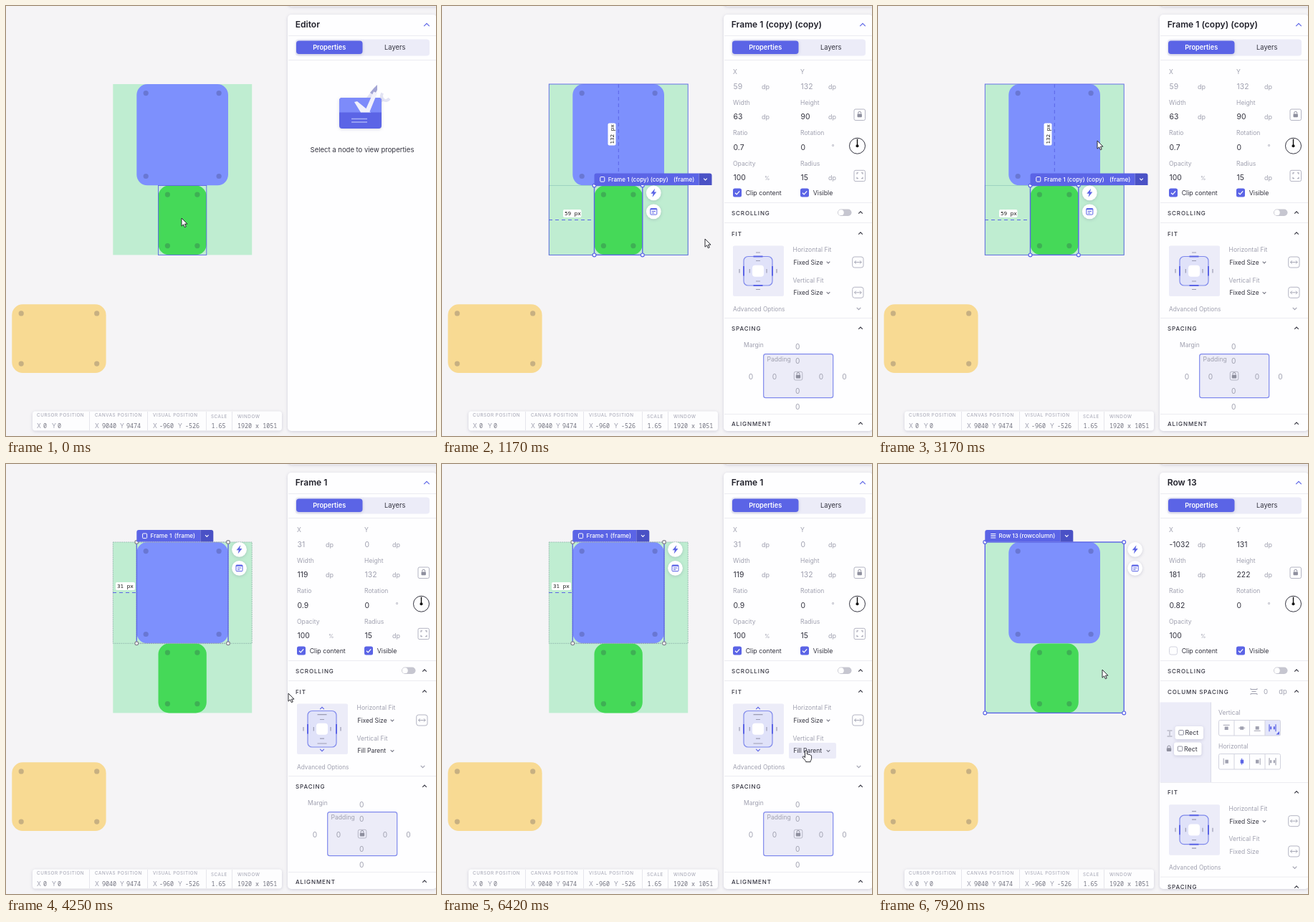
These frames come from a looping animation (600x600 px, 8 s). An HTML page:

```html
<!DOCTYPE html>
<html lang="en">
<head>
<meta charset="utf-8">
<title>Layout editor</title>
<style>
html, body { margin: 0; width: 100%; height: 100%; overflow: hidden; background: #f5f4f6; }
svg { display: block; width: 100vw; height: 100vh; font-family: Inter, sans-serif; }
.mono { font-family: "Noto Sans Mono", monospace; }
.shadow { filter: drop-shadow(0 1px 2px rgba(60, 60, 110, .2)); }
</style>
</head>
<body>
<svg id="stage" viewBox="0 0 600 600"></svg>
<script>
const LOOP = 8000, FPS = 12;
const INDIGO = '#5b64e6', SOFT = '#ececf8', INK = '#33333f', GREY = '#a0a1b0', LINE = '#ececf1';

const container = { x: 149.3, y: 109, w: 193.9, h: 238.4, name: 'Row 13', kind: '(rowcolumn)', tagW: 123, kindX: 48 };
const blue = { x: 182.3, y: 109, w: 127.7, h: 141.3, name: 'Frame 1', kind: '(frame)', tagW: 107, kindX: 52.5 };
const green = { x: 212.5, y: 250.5, w: 67.3, h: 96.9, name: 'Frame 1 (copy) (copy)', kind: '(frame)', tagW: 164, kindX: 110.5 };
const yellow = { x: 8.3, y: 416.3, w: 131.3, h: 95.6 };

// Pointer path: [tick, x, y]
const path = [
  [0, 245, 296], [12, 245, 296], [13, 300, 310], [14, 367, 325], [15, 432, 341], [16, 480, 352], [18, 510, 359],
  [21, 510, 359], [23, 511, 372], [26, 513, 404], [28, 513, 412], [30, 514, 409],
  [32, 514, 409], [33, 495, 385], [35, 405, 274], [36, 362, 230], [37, 328, 204], [38, 306, 188], [40, 283, 172],
  [47, 283, 172], [48, 291, 188], [50, 350, 270], [51, 394, 320], [52, 430, 350], [54, 471, 388], [57, 491, 406], [58, 489, 405],
  [64, 489, 405], [66, 500, 380], [69, 518, 352],
  [71, 518, 352], [73, 515, 372], [77, 508, 400],
  [81, 508, 400], [82, 490, 390], [84, 405, 340], [86, 325, 294], [87, 313, 287], [96, 313, 287]
];

// Drawing helpers
const rect = (x, y, w, h, fill, r = 0, extra = '') =>
  `<rect x="${x}" y="${y}" width="${w}" height="${h}" fill="${fill}" rx="${r}" ${extra}/>`;
const stroke = (d, color, width = 1, extra = '') =>
  `<path d="${d}" fill="none" stroke="${color}" stroke-width="${width}" ${extra}/>`;
const circle = (x, y, r, fill, extra = '') => `<circle cx="${x}" cy="${y}" r="${r}" fill="${fill}" ${extra}/>`;
const text = (x, y, s, size, fill = INK, extra = '') =>
  `<text x="${x}" y="${y}" font-size="${size}" fill="${fill}" ${extra}>${s}</text>`;
const mid = (x, y, s, size, fill, extra = '') => text(x, y, s, size, fill, 'text-anchor="middle" ' + extra);
const move = (x, y, s, extra = '') => `<g transform="translate(${x} ${y})" ${extra}>${s}</g>`;
const mono = (x, y, s, fill = '#70717e', size = 8.4) => text(x, y, s, size, fill, 'class="mono"');
const label = (x, y, s) => text(x, y, s, 8.6, GREY);
const chevron = (x, y, dir, color = INK, r = 2.8) => stroke(`M${x - r} ${y - dir * r / 2}l${r} ${dir * r} ${r} ${-dir * r}`, color, 1.1);
const frame = (b, color, width, extra) => rect(b.x, b.y, b.w, b.h, 'none', 0, `stroke="${color}" stroke-width="${width}" ${extra || ''}`);
const rule = y => stroke(`M394 ${y}H600`, LINE);
const heading = (y, s) => text(404, y + 3.3, s, 8, INK, 'letter-spacing=".9" font-weight="500"') + chevron(584, y, -1);
const outlined = (x, y, w, h, color = '#b4b5c3', r = 2) => rect(x, y, w, h, 'none', r, `stroke="${color}"`);
const lock = (x, y) => rect(x - 3.2, y - 1, 6.4, 4.8, '#8e8f9e', 1) + stroke(`M${x - 2} ${y - 1}v-1.2a2 2 0 0 1 4 0v1.2`, '#8e8f9e');

function tile(b, fill) {
  const dots = [[12.9, 12.6], [b.w - 12.9, 12.6], [12.9, b.h - 12.8], [b.w - 12.9, b.h - 12.8]];
  return rect(b.x, b.y, b.w, b.h, fill, 15) +
    dots.map(([x, y]) => circle(b.x + x, b.y + y, 3.6, '#25254a', 'opacity=".23"')).join('');
}

function statusBar() {
  const caps = (x, y, s) => text(x, y, s, 6.3, GREY, 'letter-spacing=".55"');
  const axis = (x, s) => text(x, 588.6, s, 8.6, GREY);
  const pair = (x, vx, a, yx, vy, b) => axis(x, 'X') + mono(vx, 588.6, a) + axis(yx, 'Y') + mono(vy, 588.6, b);
  return rect(37, 565.5, 348, 27, '#fdfdfe', 4, 'class="shadow"') +
    [116.5, 197.5, 279.5, 315.5].map(x => stroke(`M${x} 566v26`, '#e6e6ec')).join('') +
    caps(43, 573.3, 'CURSOR POSITION') + caps(124, 573.3, 'CANVAS POSITION') + caps(205, 573.3, 'VISUAL POSITION') +
    caps(286, 575.2, 'SCALE') + caps(323, 575.2, 'WINDOW') +
    pair(43, 52, '0', 64, 72, '0') + pair(124, 134, '9040', 159, 168, '9474') + pair(205, 214, '-960', 240, 250, '-526') +
    mono(286.5, 588.6, '1.65') + mono(323, 588.6, '1920 x 1051');
}

function selection(b) {
  const right = b.x + b.w, bottom = b.y + b.h, top = b.y - 17, split = b.tagW - 18;
  const edge = b === blue
    ? frame(b, '#9a9ab4', .8, 'stroke-dasharray="2 1"') + stroke(`M${b.x} ${b.y}V${bottom}M${right} ${b.y}V${bottom}`, INDIGO, 1.3)
    : frame(b, INDIGO, 1.4);
  const handle = (x, y) => circle(x, y, 2.4, '#fff', `stroke="${b === blue ? '#85868f' : INDIGO}" stroke-width="1.2"`);
  const icon = b === container
    ? stroke('M8 5.5h7M8 8.2h7M8 11h7', '#fff', 1.2) : outlined(8.3, 5, 6, 6.6, '#fff', 1);
  const tag = `<path d="M0 16.5V3q0-3 3-3H${split}V16.5z" fill="${INDIGO}"/>` +
    `<path d="M${split} 0h15q3 0 3 3v13.5H${split}z" fill="#4a51c5"/>` + icon +
    text(19.3, 11.3, b.name, 8.1, '#fff', 'font-weight="500"') +
    text(b.kindX, 11.3, b.kind, 8.3, '#fff', 'font-weight="500"') + chevron(split + 9, 8.2, 1, '#fff', 2.3);
  const button = y => circle(right + 15.5, y, 10.4, '#fff', 'class="shadow"');
  return edge + handle(b.x, b.y) + handle(right, b.y) + handle(b.x, bottom) + handle(right, bottom) + move(b.x, top, tag) +
    button(b.y + 10.3) + button(b.y + 36.3) +
    move(right + 15.5, b.y + 10.3, `<path d="M1.8-6-4 1H-.7L-1.8 6 4-1.4H.7z" fill="${INDIGO}"/>`) +
    move(right + 15.5, b.y + 36.3, outlined(-4.5, -4.3, 9, 8.6, INDIGO, 1) +
      stroke('M-4.5-3.4h9', INDIGO, 1.8) + stroke('M-2.6-.3h5.2M-2.6 2h3.4', INDIGO));
}

function distances(b) {
  const tag = (x, y, w, s) => rect(x, y, w, 11, '#fff', 2) + mono(x + 2, y + 8.4, s, '#111', 7.6);
  const dash = d => stroke(d, INDIGO, 1, 'stroke-dasharray="5 4"');
  if (b === blue) return frame({ ...container, h: 141.3 }, '#8fb3aa', .8, 'stroke-dasharray="2 1"') +
    dash('M149 179.5h33') + tag(153, 165, 27, '31 px');
  if (b === green) return frame({ ...container, y: 250.5, h: 96.9 }, '#96cdbd', .8) +
    dash('M149 298.5h63') + tag(169, 284, 25.5, '59 px') + dash('M246.3 109v141') +
    move(231.5, 194.5, `<g transform="rotate(-90)">${tag(0, 0, 31, '132 px')}</g>`);
  return '';
}

function fitBox(fill) {
  const tall = fill ? 5 : 0, ticks = '#9b9cb3';
  return rect(406, 334.5, 71, 70.5, SOFT, 2) +
    rect(421, 349.5 - tall, 40, 40.5 + 2 * tall, '#e0e2f9', 6, 'stroke="#7f89ec" stroke-width="1.2"') +
    rect(433, 361.7, 16, 16, '#fff', 4) +
    stroke('M421 363v13.5M461 363v13.5', INDIGO, 2) +
    stroke('M415 367v5.5M467 367v5.5M429.3 367v5.5M453 367v5.5', ticks, 1.2) +
    (fill
      ? chevron(441, 340.8, -1, INDIGO) + chevron(441, 399.2, 1, INDIGO) + stroke('M434.5 349.7h13M438 356.5h6M434.5 390h13M438 383.2h6', ticks, 1.2)
      : stroke('M434.5 349.5h13M434.5 390h13', INDIGO, 2) + stroke('M438 344h6M438 355.5h6M438 384h6M438 395.5h6', ticks, 1.2));
}

function fitSection(b, pointer) {
  const expand = y => outlined(572.7, y, 15.3, 15, '#b4b5c3', 3) +
    stroke(`M575.5 ${y + 7.5}h9.7m-2.3-2.3 2.3 2.3-2.3 2.3m-5.1-4.6-2.3 2.3 2.3 2.3`, GREY, .9);
  const hovered = y => pointer && overDropdown(pointer, y) ? rect(484, y, 66, 22, SOFT, 2) : '';
  const isRow = b === container;
  return heading(317.3, 'FIT') + fitBox(b === blue) + hovered(346.5) + hovered(389) +
    label(489.5, 343.2, 'Horizontal Fit') + label(489.5, 385.6, 'Vertical Fit') +
    text(490.5, 360.9, 'Fixed Size', 8.5) + chevron(539, 357.8, 1, '#777886', 2.3) +
    text(490.5, 403.4, b === blue ? 'Fill Parent' : 'Fixed Size', 8.5, isRow ? GREY : INK) +
    (isRow ? '' : chevron(539, 400.2, 1, '#777886', 2.3)) +
    expand(350) + (b === blue ? '' : expand(392.3)) +
    text(406, 425.8, 'Advanced Options', 8.3, GREY) + chevron(581.5, 422.3, 1, GREY) +
    rule(435.5) + heading(449.5, 'SPACING');
}

function spacingSection() {
  const zero = (x, y) => mid(x, y, '0', 10.2, GREY);
  return text(421, 475.5, 'Margin', 8.5, GREY) +
    rect(448.7, 485.7, 97, 61, SOFT, 3, 'stroke="#7f89ec" stroke-width="1.2"') + text(453.5, 496.3, 'Padding', 8.6, GREY) +
    zero(496.3, 478.6) + zero(496.3, 499.4) + zero(496.3, 541.2) + zero(496.3, 562.8) +
    [431, 464, 529, 561.5].map(x => zero(x, 520.5)).join('') +
    outlined(491.3, 510.3, 11.5, 11.7) + lock(497, 515.7) + rule(569.5) + heading(582.5, 'ALIGNMENT');
}

function columnSection() {
  const chip = (x, y, w) => rect(x, y, w, 18, '#fff', 3, 'class="shadow"') + outlined(x + 5.3, y + 5.5, 6.5, 6.5, '#8f90a0', 1) +
    text(x + 14, y + 12.3, 'Rect', 8.8);
  const group = y => outlined(475.5, y, 86, 21.5, '#d2d3df') +
    stroke([497, 518.5, 540].map(x => `M${x} ${y}v21.5`).join(''), '#d2d3df');
  const bars = (x, y, side, color) => // side: -1 start, 0 centre, 1 end
    stroke(`M${x + side * 4} ${y - 4.5}v9`, color) + rect(x - 2 - side * .2, y - 2.5, 4.5, 5, color);
  const turn = (x, y, side) => `<g transform="rotate(90 ${x} ${y})">${bars(x, y, side, GREY)}</g>`;
  const between = (x, y, color) => stroke(`M${x - 4.5} ${y - 5}v10M${x + 4.5} ${y - 5}v10`, color, 1.2) +
    rect(x - 3.3, y - 2, 2, 4, color) + rect(x + 1.3, y - 2, 2, 4, color);
  return heading(317.3, 'COLUMN SPACING') +
    stroke('M520 313v1.5h9V313M520 322v-1.5h9V322M521.5 317.5h6', GREY) + mid(541, 321, '0', 9.6, GREY) + mid(565, 321, 'dp', 9.2, GREY) +
    rect(393.5, 332.5, 71, 111.5, SOFT) + stroke('M464.5 332.5V444', '#dadbe8') +
    chip(414.5, 366, 39.5) + chip(413, 388.5, 38.5) + stroke('M403.5 372h7M403.5 380h7M407 373v6', GREY) + lock(406, 397.2) +
    label(475, 350.3, 'Vertical') + label(475, 397.2, 'Horizontal') +
    rect(540, 357.5, 21.5, 21.5, '#e4e6fb') + group(357.5) + group(404.5) +
    turn(486.2, 368.3, -1) + turn(507.7, 368.3, 0) + turn(529.2, 368.3, 1) + between(550.5, 368.3, INDIGO) +
    `<path d="M560 373v4.5h-4.5z" fill="${INDIGO}"/>` +
    bars(486.2, 415.2, -1, GREY) + bars(507.7, 415.2, 0, INDIGO) + bars(529.2, 415.2, 1, GREY) + between(550.5, 415.2, GREY) +
    rule(444.5);
}

function properties(b, pointer) {
  const isRow = b === container;
  const [x, y, w, h, ratio] = isRow ? ['-1032', '131', '181', '222', '0.82']
    : b === blue ? ['31', '0', '119', '132', '0.9'] : ['59', '132', '63', '90', '0.7'];
  const field = (fx, fy, name, value, unit, off) => label(fx, fy, name) +
    text(fx + .5, fy + 20.5, value, 10.4, off ? GREY : INK) + (unit ? text(fx + (fx < 450 ? 40 : 39), fy + 20.3, unit, 9, GREY) : '');
  const check = (cx, s, on) => (on
    ? rect(cx, 254.5, 12, 12, INDIGO, 2.5) + stroke(`M${cx + 3} 260.7l2.2 2.2 4-4.5`, '#fff', 1.3)
    : outlined(cx + .5, 255, 11, 11, '#d2d3df', 2.5)) + text(cx + 17.7, 263.8, s, 8.8);
  return field(406, 95.2, 'X', x, 'dp', !isRow) + field(500, 95.2, 'Y', y, 'dp', !isRow) +
    field(406, 137.7, 'Width', w, 'dp') + field(500, 137.7, 'Height', h, 'dp', b === blue) +
    field(406, 180.3, 'Ratio', ratio) + field(500, 180.3, 'Rotation', '0') + text(543.5, 200.3, '°', 9, GREY) +
    field(406, 222.8, 'Opacity', '100') + text(450, 243, '%', 7.5, GREY) +
    (isRow ? '' : field(500, 222.8, 'Radius', '15', 'dp') + outlined(575, 229.3, 15.5, 15.3) +
      stroke('M579 234.7v-2h2m4 0h2v2m0 4v2h-2m-4 0h-2v-2', GREY, 1.1)) +
    outlined(575, 144, 15.5, 15.5) + lock(582.7, 151.5) +
    circle(579.5, 195.2, 11, 'none', `stroke="${INK}"`) + stroke('M579.5 185.5v9.7', '#111', 1.4) + circle(579.5, 195.2, 2, '#111') +
    check(406, 'Clip content', !isRow) + check(500, 'Visible', true) +
    rule(274.5) + heading(288.2, 'SCROLLING') + rect(552, 283.5, 19.5, 9.5, '#c6c6d0', 4.75) + circle(556.8, 288.2, 3.9, '#fff') +
    rule(302.5) + (isRow ? columnSection() + move(0, 140.7, fitSection(b)) : fitSection(b, pointer) + spacingSection());
}

function emptyState() {
  return `<path d="M489 146 513 115l5-5 0 7-18 30z" fill="#e6e6f6"/><path d="M508 121l5-6 5-5 0 7-4 8z" fill="#a3a5d4"/>` +
    stroke('M499 150 526 129', '#e2e3f3', 6) + stroke('M525 121.5q-3 7 3 10 4 1.500 7-2.500', '#e2e3f3', 4) +
    `<path d="M486 134 509 149h-18z" fill="#f5f5fd"/>` +
    rect(465, 128, 59, 43, INDIGO, 4, 'class="shadow"') +
    '<path d="M465 148.500V132q0-4 4-4h51q4 0 4 4v16.500z" fill="#7d8bfa"/>' +
    '<path d="M486 134l4-1 19 15.500h-14zM500 148.500l13-29 5 2-11 27z" fill="#f1f1fb"/>' +
    stroke('M482 157.500h22M482 162h22', '#a9b0f6', 1.4) +
    mid(497, 203.7, 'Select a node to view properties', 9.5, INK);
}

function panel(b, pointer) {
  return rect(393, -20, 212, 20.5, '#fefeff', 5, 'class="shadow"') + rect(393, 12, 208, 581, '#fefeff', 5, 'class="shadow"') +
    `<clipPath id="inside">${rect(393, 12, 208, 581, '#000', 5)}</clipPath><g clip-path="url(#inside)">` +
    text(403.7, 30.3, b ? b.name : 'Editor', 12.1, '#20202a', 'font-weight="600"') + chevron(587, 26.3, -1, INDIGO, 3.8) +
    rule(41.5) + rect(404, 46.5, 187, 23, SOFT, 4) + rect(405, 48.5, 92.500, 18.500, INDIGO, 4, 'class="shadow"') +
    mid(451.2, 61.3, 'Properties', 9.2, '#fff', 'font-weight="600"') + mid(542.7, 61.3, 'Layers', 9.3, INK) + rule(75.5) +
    (b ? properties(b, pointer) : emptyState()) + '</g>';
}

// Pointer behaviour
function pointerAt(tick) {
  const i = Math.max(1, path.findIndex(p => p[0] >= tick));
  const [t0, x0, y0] = path[i - 1], [t1, x1, y1] = path[i], k = (tick - t0) / (t1 - t0);
  return { x: x0 + (x1 - x0) * k, y: y0 + (y1 - y0) * k };
}
const inside = (p, b) => p.x >= b.x && p.x <= b.x + b.w && p.y >= b.y && p.y <= b.y + b.h;
const overDropdown = (p, y) => inside(p, { x: 484, y, w: 66, h: 22 });
const clickable = p => overDropdown(p, 346.5) || overDropdown(p, 389) || inside(p, { x: 400, y: 411, w: 192, h: 22 });

function cursor(p) {
  const shape = clickable(p)
    ? 'M-1.500 8V1.200q0-1.400 1.400-1.400t1.400 1.400V5q2-.7 2.500.6 1.900-.6 2.300.8 1.500-.3 1.500 1.300v3q0 2-1.400 3.800v1.200h-6.500V14.500L-4.500 9.800q-.9-1.500.3-2 1-.4 2.700 1.900z'
    : 'M0 0V11.200L2.600 8.800 4.300 12.700 6.200 11.900 4.500 8.100H8z';
  return move(p.x, p.y, `<path d="${shape}" fill="#fff" stroke="#22222a" stroke-width=".95" stroke-linejoin="round"/>`);
}

const selectedAt = tick => tick < 7 ? null : tick < 44 ? green : tick < 93 ? blue : container;

function scene(tick) {
  const pointer = pointerAt(tick), before = pointerAt(Math.max(0, tick - 1));
  const selected = selectedAt(tick), hovered = [green, blue, container].find(b => inside(before, b));
  return rect(0, 0, 600, 600, '#f5f4f6') + rect(container.x, container.y, container.w, container.h, '#bfedd1') +
    tile(blue, '#7d90fd') + tile(green, '#45d958') + tile(yellow, '#f8da93') +
    (selected ? distances(selected) : '') + (hovered && hovered !== selected ? frame(hovered, INDIGO, .9) : '') +
    (selected ? selection(selected) : '') + statusBar() + panel(selectedAt(tick - 1), pointer) + cursor(pointer);
}

const stage = document.getElementById('stage');
let shown = -1;
function render() {
  const tick = Math.floor((performance.now() % LOOP + 5) * FPS / 1000) % (LOOP * FPS / 1000);
  if (tick !== shown) stage.innerHTML = scene(shown = tick);
  requestAnimationFrame(render);
}
render();
</script>
</body>
</html>
```
